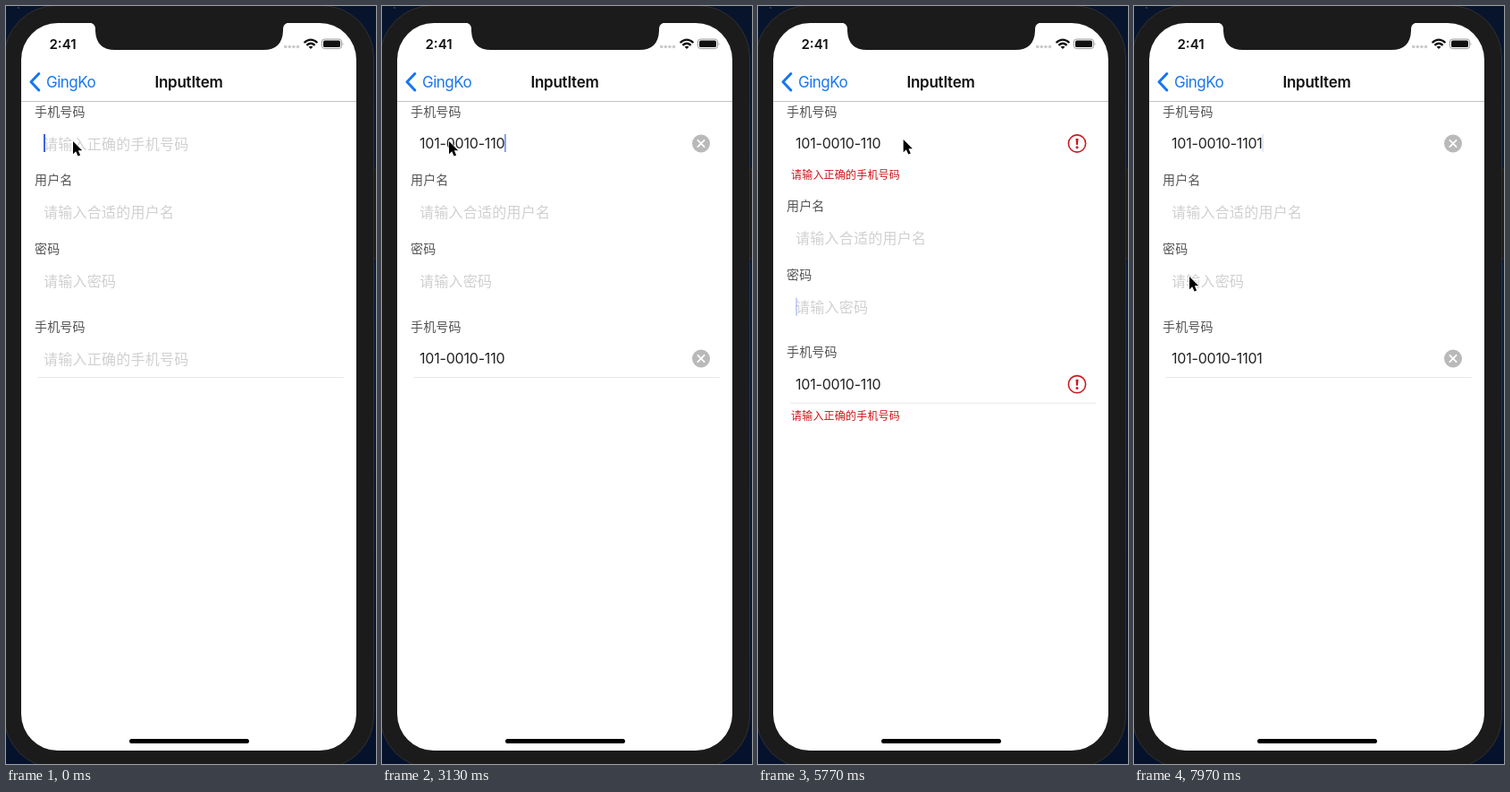
Recreate the animation shown at these times as an HTML page. Size 414 px wide and 846 px high, loop 8 s.

```html
<!DOCTYPE html>
<html lang="zh">
<head>
<meta charset="utf-8">
<title>InputItem</title>
<style>
  html, body { margin: 0; width: 100%; height: 100%; overflow: hidden; background: #06142f; }
  svg { display: block; width: 414px; height: 846px; }
  text { font-family: Inter, "Noto Sans CJK SC", "Noto Sans CJK", sans-serif; white-space: pre; }
  .label { font-size: 14px; letter-spacing: .15px; fill: #555; }
  .hint { font-size: 16px; font-weight: 300; letter-spacing: .25px; fill: #d0d0d0; }
  .value { font-size: 16px; letter-spacing: -.2px; fill: #222; }
  .error { font-size: 12px; font-weight: 500; letter-spacing: .2px; fill: #cb1518; }
</style>
</head>
<body>
<svg viewBox="0 0 414 846">
  <defs>
    <linearGradient id="night" x2="0" y2="1">
      <stop offset="0" stop-color="#07142b"/>
      <stop offset=".4" stop-color="#071b44"/>
      <stop offset="1" stop-color="#06122c"/>
    </linearGradient>
    <g id="clear">
      <circle r="10" fill="#b9b9b9"/>
      <path d="M-3.6-3.6 3.6 3.6M3.6-3.6-3.6 3.6" stroke="#fff" stroke-width="1.8" stroke-linecap="round"/>
    </g>
    <g id="alert">
      <circle r="9.6" fill="#fff" stroke="#cb1a1e" stroke-width="1.6"/>
      <path d="M-1.5-5.5H1.5L.9 1.6H-.9Z" fill="#cb1a1e"/>
      <circle cy="4.2" r="1.5" fill="#cb1a1e"/>
    </g>
  </defs>

  <rect width="414" height="846" fill="url(#night)"/>
  <circle cx="14" cy="2" r=".8" fill="#52658a"/>
  <rect x="409" y="181" width="5" height="101" rx="1" fill="#181818" stroke="#303238" stroke-width=".6"/>
  <rect x="-2" y="-.5" width="413.5" height="851" rx="58" fill="#1b1b1b" stroke="#303030"/>
  <rect x="17" y="19" width="375" height="812" rx="41" fill="#fff"/>
  <path d="M93 18.5Q100 19 100 26V28Q101 49 122 49H288Q309 49 310 28V26Q310 19 317 18.5Z" fill="#1b1b1b"/>

  <text x="48.5" y="47.5" font-size="15" font-weight="600" fill="#111">2:41</text>
  <g fill="#cbcbcb">
    <circle cx="312.7" cy="45.5" r="1.8"/><circle cx="317.3" cy="45.5" r="1.8"/>
    <circle cx="321.9" cy="45.5" r="1.8"/><circle cx="326.5" cy="45.5" r="1.8"/>
  </g>
  <g fill="none" stroke="#111" stroke-width="2.3">
    <path d="M333.6 41Q341 34.2 348.4 41M336.4 43.9Q341 39.7 345.6 43.9"/>
  </g>
  <path d="M338.5 45.6Q341 43.8 343.5 45.6L341 48Z" fill="#111"/>
  <rect x="353.5" y="37" width="22" height="10.6" rx="3" fill="none" stroke="#999"/>
  <rect x="355" y="38.5" width="19" height="7.6" rx="1.7" fill="#111"/>
  <path d="M376.7 40.5Q378.3 42.3 376.7 44.2Z" fill="#999"/>

  <path d="M36.8 75.5 28 84.7 36.8 94" fill="none" stroke="#1677f0" stroke-width="3" stroke-linecap="round" stroke-linejoin="round"/>
  <text x="45" y="91" font-size="17" letter-spacing="-.5" fill="#1677f0">GingKo</text>
  <text x="204.5" y="91" font-size="17" font-weight="600" letter-spacing="-.25" text-anchor="middle" fill="#111">InputItem</text>
  <path d="M17 106.5H392" stroke="#c4c4c4"/>

  <g id="first"></g>
  <g id="below">
    <g id="user"></g>
    <g id="password"></g>
    <g id="second"></g>
    <path d="M36 414.5H378" stroke="#e7e7e7"/>
  </g>

  <rect id="caret" width="2" height="20" fill="#3d64d8"/>
  <rect x="138" y="818" width="134" height="5" rx="2.5" fill="#000"/>
  <path id="mouse" d="M0 0V14.2L3.2 11.2 5.6 16.6 8.1 15.5 5.8 10.2H10.2Z" fill="#000" stroke="#fff" stroke-width="1.1" paint-order="stroke"/>
</svg>
<script>
const $ = id => document.getElementById(id);
const LOOP = 8000, DIGITS = '10100101101', SHIFT = 28.7;
const FIRST_KEY = 1000, KEY_GAP = 173, TEN_DIGITS = 10;
const LEAVE = 5130, RETURN = 5930, LAST_KEY = 6300;
const MOUSE = [
  [0, 75, 151], [4100, 75, 151], [4800, 79, 308], [5200, 79, 308],
  [5750, 163, 149], [5930, 154, 149], [7420, 154, 149], [7900, 62, 302], [LOOP, 62, 302]
];

function addField(id, y, label, hint) {
  $(id).innerHTML = `
    <text class="label" x="32" y="${y - 31}">${label}</text>
    <text class="hint" x="42" y="${y + 6}">${hint}</text>
    <text class="value" x="42" y="${y + 5.7}"></text>
    <use class="clear" href="#clear" x="357" y="${y}"/>
    <use class="alert" href="#alert" x="357" y="${y}"/>
    <text class="error" x="37" y="${y + 39.7}">${hint}</text>`;
  const part = name => $(id).querySelector('.' + name);
  const show = (name, on) => part(name).setAttribute('visibility', on ? 'visible' : 'hidden');
  return (text, bad) => {
    part('value').textContent = text;
    show('hint', !text);
    show('clear', text && !bad);
    show('alert', bad);
    show('error', bad);
    return text ? part('value').getComputedTextLength() : 0;
  };
}

const setFirst = addField('first', 153.5, '手机号码', '请输入正确的手机号码');
const setSecond = addField('second', 393.5, '手机号码', '请输入正确的手机号码');
addField('user', 230, '用户名', '请输入合适的用户名')('', false);
addField('password', 307, '密码', '请输入密码')('', false);

const clamp = v => Math.max(0, Math.min(1, v));
const smooth = v => { v = clamp(v); return v * v * (3 - 2 * v); };
const format = s => [s.slice(0, 3), s.slice(3, 7), s.slice(7)].filter(Boolean).join('-');

function typedCount(t) {
  if (t >= LAST_KEY) return TEN_DIGITS + 1;
  return Math.max(0, Math.min(TEN_DIGITS, Math.floor((t - FIRST_KEY) / KEY_GAP) + 1));
}

function blinkStart(t, count) {
  if (t >= LAST_KEY) return LAST_KEY;
  if (t >= RETURN) return RETURN;
  if (t >= LEAVE) return LEAVE;
  return count ? FIRST_KEY + (count - 1) * KEY_GAP : 0;
}

function blink(age) {
  const phase = age % 1000;
  return phase < 800 ? 1 - clamp((phase - 500) / 200) : clamp((phase - 850) / 150);
}

function mouseAt(t) {
  const i = MOUSE.findIndex(k => k[0] > t);
  const [t0, x0, y0] = MOUSE[i - 1], [t1, x1, y1] = MOUSE[i];
  const p = smooth((t - t0) / (t1 - t0));
  return [x0 + (x1 - x0) * p, y0 + (y1 - y0) * p];
}

function draw(t) {
  const count = typedCount(t);
  const text = format(DIGITS.slice(0, count));
  const bad = t >= LEAVE && t < LAST_KEY;
  const width = setFirst(text, bad);
  setSecond(text, bad);

  const shift = SHIFT * (smooth((t - LEAVE) / 150) - smooth((t - LAST_KEY) / 150));
  $('below').setAttribute('transform', `translate(0 ${shift})`);

  const inPassword = t >= LEAVE && t < RETURN;
  $('caret').setAttribute('x', inPassword ? 42 : 42 + Math.max(0, width - .5));
  $('caret').setAttribute('y', inPassword ? 297 + shift : 143);
  $('caret').setAttribute('opacity', blink(t - blinkStart(t, count)));
  $('mouse').setAttribute('transform', `translate(${mouseAt(t)})`);
}

const start = performance.now();
function tick() {
  draw((performance.now() - start) % LOOP);
  requestAnimationFrame(tick);
}
draw(0);
requestAnimationFrame(tick);
</script>
</body>
</html>
```
